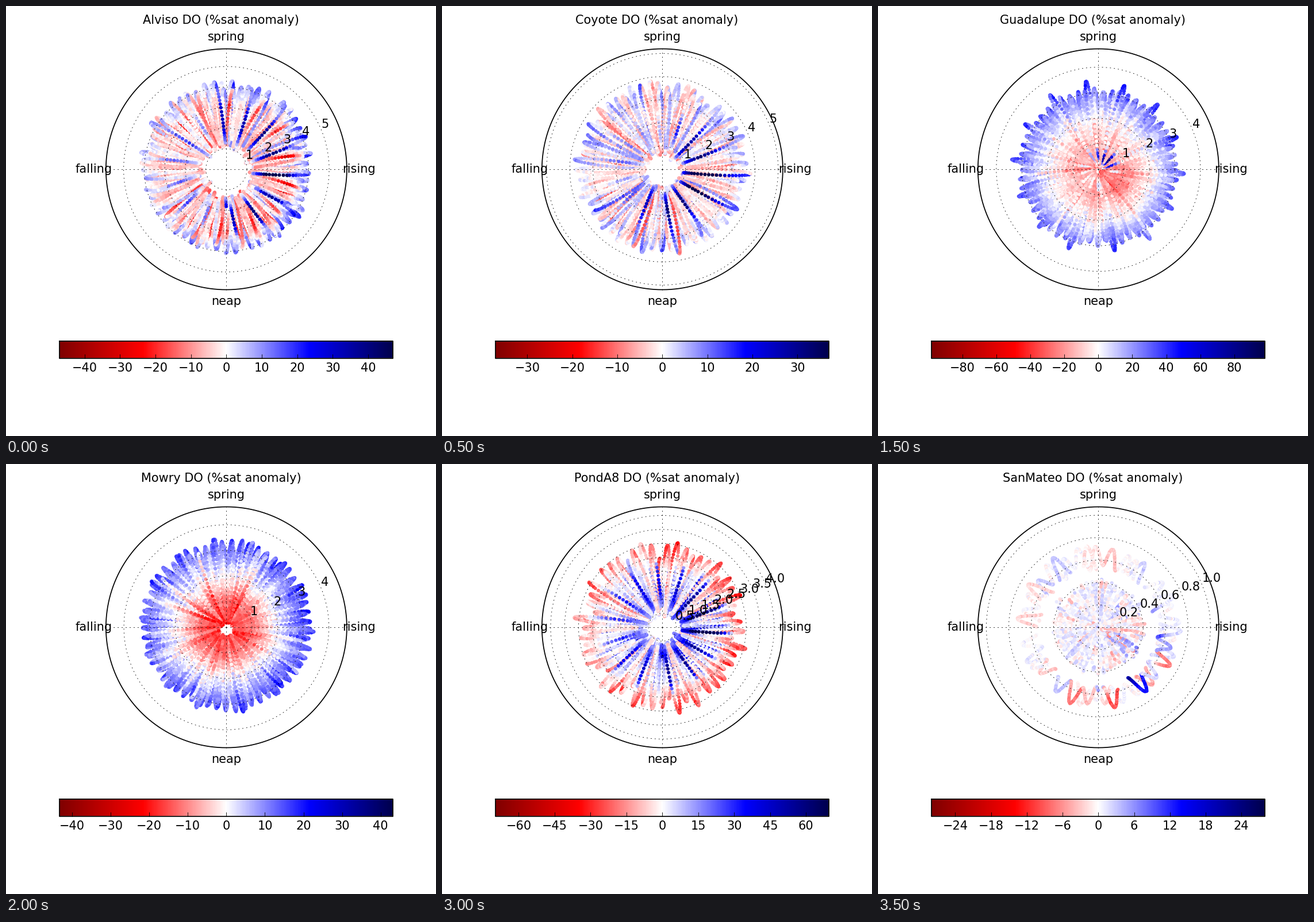
Animation, 748 px wide and 748 px high, one loop 4000 ms. Source, as a matplotlib script:

```python
import numpy as np
import matplotlib.pyplot as plt
from matplotlib.animation import ArtistAnimation

SIZE, DPI = 748, 125
PT = 72 / DPI                       # points per pixel
CX, CY, RADIUS = 383.35, 284, 209.5
BAR_L, BAR_R, BAR_T, BAR_B = 93.5, 673.2, 583, 612.5
LUNAR_DAY = 25.23                   # degrees of the spring-neap circle
TIP = 150                           # reach of the highest tide in pixels

plt.rcParams["font.family"] = "DejaVu Sans"
plt.rcParams["font.size"] = 12

fig = plt.figure(figsize=(SIZE / DPI, SIZE / DPI), dpi=DPI, facecolor="white")
ax = fig.add_axes([0, 0, 1, 1])
ax.axis("off")


def ramp(x, lo, hi):
    return np.clip((x - lo) / (hi - lo), 0, 1)


def bump(x, mid, width):
    return np.exp(-((x - mid) / width) ** 2)


def polar(r, deg):
    a = np.radians(deg)
    return CX + r * np.cos(a), CY - r * np.sin(a)


class Tide:
    """Tidal height along several spring-neap turns, sampled every 15 minutes."""

    def __init__(self, seed, turns, mid, amp, tilt, spike=0, spring=0.05, rough=2.5):
        rng = np.random.default_rng(seed)
        total = np.arange(-90 - 360 * (turns - 1), 270, 0.254)
        self.rng = rng
        self.deg = total
        self.last = total >= -90
        days = (total + 3) / LUNAR_DAY
        self.phase = days % 1
        stroke = np.floor(4 * days).astype(int)
        stroke -= stroke.min()
        self.tone = rng.normal(size=stroke.max() + 1)[stroke]
        tide = np.floor(2 * days + 0.5).astype(int)
        self.tide = tide - tide.min()
        wobble = rng.normal(0, rough, stroke.max() + 2)
        sway = np.interp(days * 4 - np.floor(days[0] * 4),
                         np.arange(len(wobble)), wobble)
        north = np.sin(np.radians(total))
        r = mid + amp * (1 + spring * north) * np.cos(4 * np.pi * days)
        r += tilt * np.cos(2 * np.pi * days - 0.6) + sway
        r += spike * self.last * bump(np.abs(self.phase - 0.5), 0.5, 0.13)
        self.r = np.clip(r + rng.normal(0, 0.4, len(r)), 2, 154)
        self.u = self.r / TIP
        self.east = 0.5 + 0.5 * np.cos(np.radians(total + 15))
        self.grain = rng.normal(0, 0.03, len(r))

    def toward(self, deg, power=2):
        return np.clip(np.cos(np.radians(self.deg - deg)), 0, 1) ** power

    def per_tide(self, draw):
        return draw(size=self.tide.max() + 1)[self.tide]


def alviso():
    t = Tide(3, 5, 94, 46, 6, 3, 0.1, 4)
    v = -0.09 + 0.13 * t.tone + 0.33 * ramp(t.u, 0.76, 1) * (0.5 + 0.7 * t.east)
    v -= 0.4 * t.east * bump(t.phase, 0.59, 0.05) * t.last
    blue = bump(t.phase, 0.86, 0.06) * ramp(t.u, 0.92, 0.75)
    v += (0.3 + 0.75 * t.east) * blue * t.last
    return t, v


def coyote():
    t = Tide(5, 4, 88, 52, 6, 3, 0.05, 4)
    v = -0.04 + 0.13 * t.tone + 0.12 * ramp(t.u, 0.7, 1)
    v += (0.3 + 0.6 * t.east) * bump(t.phase, 0.84, 0.06) * t.last
    return t, v


def dumbarton():
    t = Tide(7, 5, 94, 48, 5, 2, 0.08)
    v = np.interp(t.u, [0.25, 0.4, 0.6, 0.75, 1], [-0.5, -0.34, -0.03, 0.11, 0.17])
    v += 0.04 * t.tone
    v += t.toward(-50, 4) * (0.14 * t.tone + 0.08)
    return t, v


def guadalupe():
    t = Tide(11, 5, 72, 60, 4, 14)
    v = np.interp(t.u, [0, 0.3, 0.6, 0.8, 1], [-0.21, -0.14, 0.0, 0.17, 0.36])
    v += 0.06 * t.tone - 0.12 * t.toward(-35, 4) * ramp(t.u, 0.8, 0.3)
    v += t.last * bump(t.phase, 0.8, 0.025) * (0.15 + 0.8 * t.toward(50))
    return t, v


def mowry():
    t = Tide(13, 5, 80, 62, 5, 4)
    v = np.interp(t.u, [0, 0.3, 0.6, 0.8, 1], [-0.4, -0.28, 0.0, 0.15, 0.3])
    v += 0.07 * t.tone + 0.08 * t.east * ramp(t.u, 0.4, 0.8)
    return t, v


def newark():
    t = Tide(17, 6, 74, 68, 3, 2, 0.03)
    v = np.interp(t.u, [0, 0.25, 0.5, 0.7, 0.95], [-0.46, -0.34, -0.02, 0.17, 0.37])
    v += 0.05 * t.tone + 0.12 * t.east * ramp(t.u, 0.4, 0.85)
    return t, v


def pond():
    t = Tide(19, 3, 84, 51, 8, 4, 0.02, 6)
    v = -0.02 + 0.1 * t.tone
    v -= 0.3 * ramp(t.u, 0.65, 0.95) * (0.45 + 0.7 * t.east)
    blue = bump(t.phase, 0.85, 0.07) + 0.5 * bump(t.phase, 0.7, 0.06)
    v += (0.4 + 0.6 * t.east) * blue * np.where(t.last, 1, 0.55) * ramp(t.u, 0.9, 0.7)
    return t, v


def outer_ring():
    t = Tide(23, 2, 121, 15, 4, 2, 0.1)
    kept = t.per_tide(t.rng.random)
    tone = t.per_tide(t.rng.normal)
    south = t.toward(-70, 2)
    v = 0.06 * tone + 0.14 * south * tone
    v += 0.35 * t.last * bump(t.phase, 0.8, 0.06) * t.toward(-40, 1)
    t.r[kept > 0.65 + 0.25 * south] = np.nan
    return t, v


def inner_disc():
    t = Tide(29, 5, 43, 32, 4)
    run = np.arange(len(t.r)) // 5
    t.r += t.rng.normal(0, 1.5, len(t.r))
    t.r[t.rng.random(run.max() + 1)[run] > 0.4] = np.nan
    v = 0.055 * t.tone * (1 + t.toward(-45, 4))
    return t, v


# title, data, colour limit, colour step, radial limit, radial step
STATIONS = [
    ("Alviso", [alviso], 47.0, 10, 5.86, 1),
    ("Coyote", [coyote], 37.0, 10, 5.2, 1),
    ("Dumbarton", [dumbarton], 29.3, 6, 6.65, 1),
    ("Guadalupe", [guadalupe], 98.1, 20, 4.72, 1),
    ("Mowry", [mowry], 43.2, 10, 4.7, 1),
    ("Newark", [newark], 44.2, 10, 4.2, 0.5),
    ("PondA8", [pond], 69.6, 15, 4.31, 0.5),
    ("SanMateo", [inner_disc, outer_ring], 27.95, 6, 1.075, 0.2),
]

DOTTED = dict(color="black", lw=0.5, ls=(0, (2, 6)), zorder=2,
              dash_capstyle="butt")
TURN = np.linspace(0, 360, 361)


def station(name, parts, vmax, vstep, rmax, rstep):
    arts = [ax.text(SIZE / 2, 15, f"{name} DO (%sat anomaly)",
                    ha="center", va="top", zorder=4)]
    for part in parts:
        t, v = part()
        ok = np.isfinite(t.r)
        x, y = polar(t.r[ok], t.deg[ok])
        arts.append(ax.scatter(x, y, c=(v + t.grain)[ok], s=(6 * PT) ** 2,
                               cmap="seismic_r", vmin=-1, vmax=1,
                               linewidths=0, zorder=1))
    for i in range(1, int(rmax / rstep) + 1):
        r = RADIUS * i * rstep / rmax
        arts += ax.plot(*polar(r, TURN), **DOTTED)
        x, y = polar(r, 22.5)
        label = f"{i * rstep:.0f}" if rstep == 1 else f"{i * rstep:.1f}"
        arts.append(ax.text(x, y - 4, label, va="baseline", zorder=4))
    n = int(vmax / vstep)
    for i in range(-n, n + 1):
        x = (BAR_L + BAR_R) / 2 + (BAR_R - BAR_L) / 2 * i * vstep / vmax
        arts += ax.plot([x, x], [BAR_B, BAR_B - 6.9], color="black",
                        lw=0.5, zorder=3)
        arts.append(ax.text(x, 619.5, str(i * vstep).replace("-", "\u2212"),
                            ha="center", va="top", zorder=4))
    return arts


ax.imshow(np.linspace(-1, 1, 256)[None, :], cmap="seismic_r", aspect="auto",
          extent=(BAR_L, BAR_R, BAR_B, BAR_T), interpolation="nearest", zorder=1)
ax.plot([BAR_L, BAR_R, BAR_R, BAR_L, BAR_L],
        [BAR_T, BAR_T, BAR_B, BAR_B, BAR_T], color="black", lw=1, zorder=3)
ax.plot(*polar(RADIUS, TURN), color="black", lw=1, zorder=3)
for deg, word in enumerate(["rising", "spring", "falling", "neap"]):
    ax.plot(*polar(np.array([0, RADIUS]), 90 * deg), **DOTTED)
    ax.text(*polar(RADIUS * 1.1, 90 * deg), word, ha="center", va="center", zorder=4)

scenes = [station(*row) for row in STATIONS]
ax.set_xlim(0, SIZE)
ax.set_ylim(SIZE, 0)

anim = ArtistAnimation(fig, scenes, interval=500, repeat=True, repeat_delay=0,
                       blit=False)
plt.show()
```
